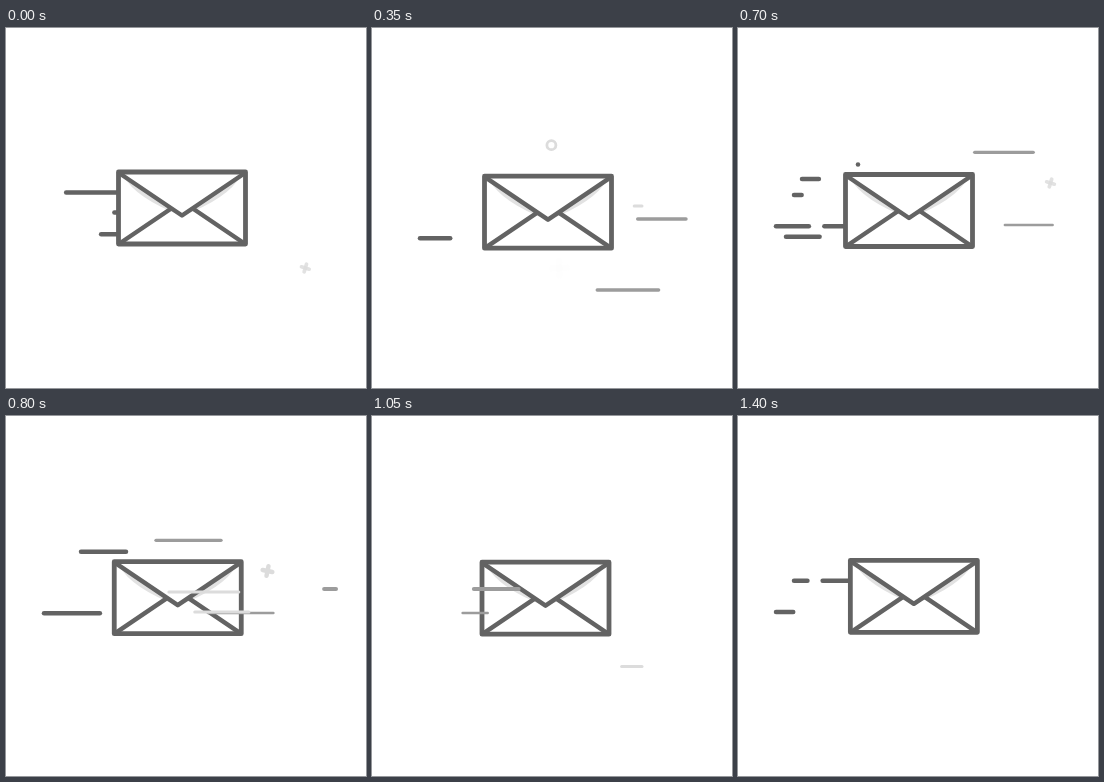
Write an HTML page with a canvas that moves like this. It is 360 px wide and 360 px high and loops after 1450 ms.

```html
<!DOCTYPE html>
<html lang="en">
<head>
<meta charset="utf-8">
<title>Flying envelope</title>
<style>
  html, body { margin: 0; height: 100%; overflow: hidden; background: #fff; }
  canvas { display: block; }
</style>
</head>
<body>
<canvas id="stage" width="360" height="360"></canvas>
<script>
const ctx = document.getElementById('stage').getContext('2d');
const LOOP = 1450, STEP = 50;
const DARK = '#636363', GREY = '#9c9c9c', LIGHT = '#dcdcdc';

// Key poses of the envelope's drift: time, left, top
const drift = [
  [0, 112.5, 144], [200, 111.5, 149], [500, 113.5, 147.3], [700, 107.5, 146.5],
  [900, 109, 144.8], [1200, 111, 147.5], [LOOP, 112.5, 144]
];

// Trails shoot out from behind the envelope, one row each
const trailRows = [
  { row: -10, reach: 54, starts: [698] },
  { row: 4.5, reach: 64, starts: [486] },
  { row: 11, reach: 60, starts: [401, 766] },
  { row: 20.5, reach: 56, starts: [462, 1175, 1312] },
  { row: 30.5, reach: 46, starts: [1039] },
  { row: 40.5, reach: 58, starts: [1403] },
  { row: 51.7, reach: 38, starts: [319, 497, 627, 1175] },
  { row: 62.2, reach: 48, starts: [149, 504, 1384] }
];

// Streaks cross in front of the envelope
const greyStreaks = [
  { y: 262, start: 157, time: 420 }, { y: 191, start: 208, time: 410 },
  { y: 124.3, start: 520, time: 420 }, { y: 197, start: 508, time: 560 },
  { y: 173, start: 750, time: 350 }
];
const lightStreaks = [
  { y: 178, to: 48, start: 326 }, { y: 176, to: 16, start: 710 },
  { y: 196, to: 70, start: 712 }, { y: 250.5, to: 46, start: 1011 }
];

const bits = [
  { shape: plus, x: 315, y: 240, speed: 0.32, start: 1401, life: 400 },
  { shape: ring, x: 318, y: 117.2, speed: 0.495, start: 70, life: 460 },
  { shape: ring, x: 313, y: 199.5, speed: 0.45, start: 420, life: 220 },
  { shape: plus, x: 338, y: 155, speed: 0.51, start: 650, life: 390 }
];

const clamp = u => Math.max(0, Math.min(1, u));
const ease = u => (1 - Math.cos(Math.PI * clamp(u))) / 2;
const mix = (a, b, u) => a + (b - a) * u;
const since = (t, start) => (t - start + LOOP) % LOOP;

function stroke(points, width, colour) {
  ctx.beginPath();
  points.forEach(([x, y]) => ctx.lineTo(x, y));
  ctx.lineWidth = width;
  ctx.strokeStyle = colour;
  ctx.stroke();
}

// A line whose tail repeats the eased run of its head after a lag
function dash(age, y, from, to, time, lag, width, colour) {
  if (age >= time + lag) return;
  const head = mix(from, to, ease(age / time));
  const tail = mix(from, to, ease((age - lag) / time));
  stroke([[head, y], [tail + 0.01, y]], width, colour);
}

function plus(age) {
  const r = 3.6 + age * 0.009;
  ctx.rotate(0.35 - age / 1000);
  stroke([[-r, 0], [r, 0]], r * 0.9, LIGHT);
  stroke([[0, -r], [0, r]], r * 0.9, LIGHT);
}

function ring() {
  ctx.beginPath();
  ctx.arc(0, 0, 4.5, 0, 7);
  ctx.lineWidth = 2.8;
  ctx.strokeStyle = LIGHT;
  ctx.stroke();
}

function drawBit(t, { shape, x, y, speed, start, life }) {
  const age = since(t, start);
  ctx.save();
  ctx.globalAlpha = clamp(age / 60) * clamp((life - age) / 60);
  ctx.translate(x - speed * age, y);
  shape(age);
  ctx.restore();
}

function envelope(x, y) {
  ctx.save();
  ctx.translate(x, y);
  ctx.fillStyle = '#fff';
  ctx.fillRect(0, 0, 127, 72);
  ctx.fillStyle = '#e2e2e2';
  ctx.fill(new Path2D('M5 4Q17 26 63.5 44Q110 26 122 4L63.5 43Z'));
  stroke([[2.5, 70.5], [52, 37]], 4.5, DARK);
  stroke([[124.5, 70.5], [75, 37]], 4.5, DARK);
  stroke([[2, 2], [63.5, 43.5], [125, 2]], 4.5, DARK);
  ctx.lineWidth = 4.8;
  ctx.strokeRect(0, 0, 127, 72);
  ctx.restore();
}

function draw(t) {
  ctx.fillStyle = '#fff';
  ctx.fillRect(0, 0, 360, 360);
  ctx.lineCap = ctx.lineJoin = 'round';

  const next = drift.findIndex(key => key[0] > t);
  const a = drift[next - 1], b = drift[next];
  const u = ease((t - a[0]) / (b[0] - a[0]));
  const left = mix(a[1], b[1], u), top = mix(a[2], b[2], u);

  for (const { row, reach, starts } of trailRows)
    for (const start of starts)
      dash(since(t, start), top + row, 120, reach, 165, 110, 4.5, DARK);
  envelope(left, top);

  // Faster streaks are thicker
  for (const { y, start, time } of greyStreaks)
    dash(since(t, start), y, 330, 90, time, time * 0.18, 1400 / time, GREY);
  for (const { y, to, start } of lightStreaks)
    dash(since(t, start), y, 270, to, 200, 40, 3, LIGHT);
  bits.forEach(bit => drawBit(t, bit));
}

const begin = performance.now();
function tick() {
  const t = (performance.now() - begin) % LOOP;
  draw(Math.floor(t / STEP) * STEP);
  requestAnimationFrame(tick);
}
tick();
</script>
</body>
</html>
```
